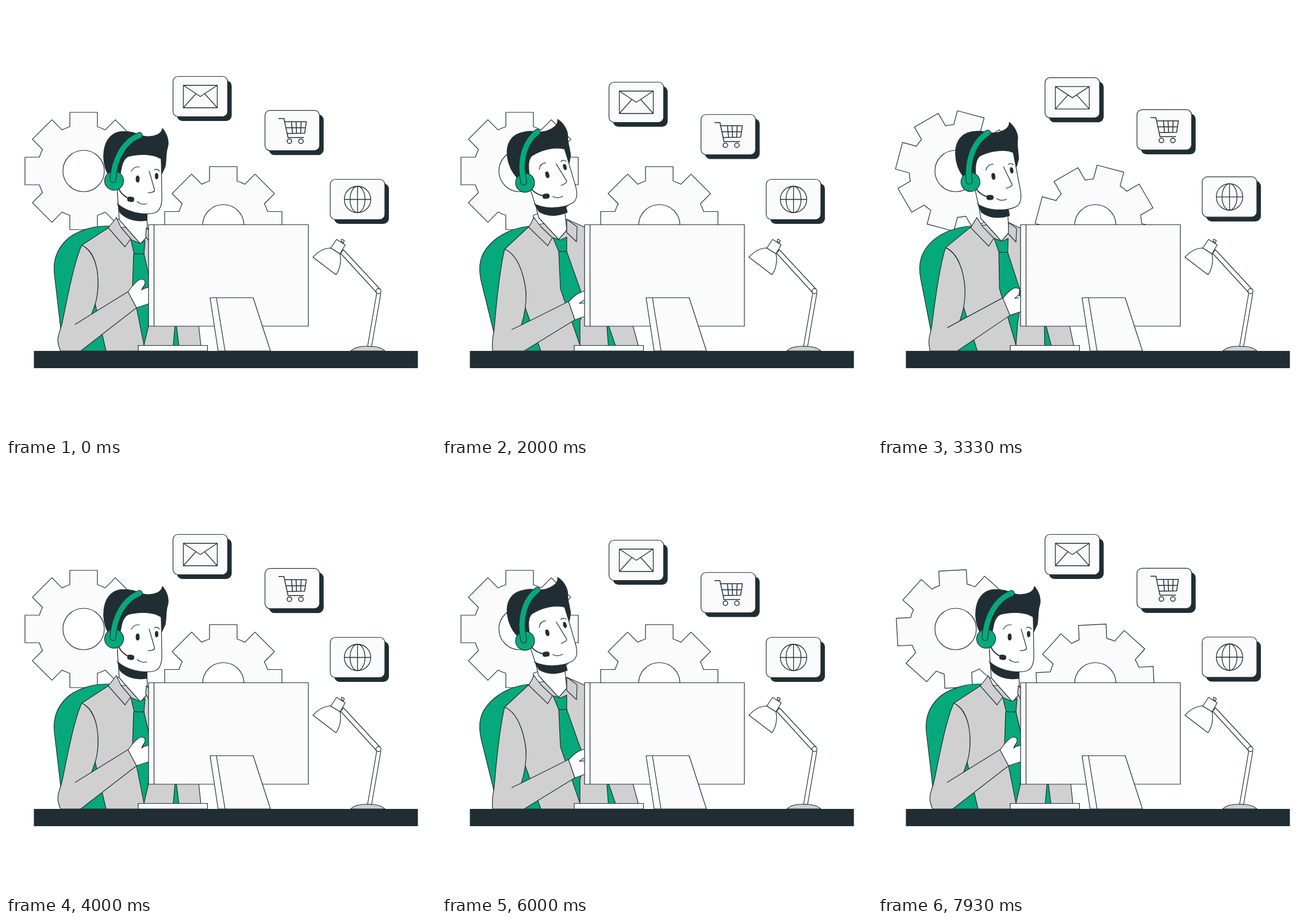
Recreate the animation shown at these times as an HTML page with a canvas. Size 748 by 748 pixels, loop 7.99 s.

```html
<!DOCTYPE html>
<html lang="en">
<head>
<meta charset="utf-8">
<title>Support desk</title>
<style>
html, body { margin: 0; width: 100%; height: 100%; overflow: hidden; background: #fff; }
canvas { display: block; width: 748px; height: 748px; }
</style>
</head>
<body>
<canvas id="stage"></canvas>
<script>
const SIZE = 748, LOOP = 7990, CYCLE = 4000;
const DARK = '#202e34', GREEN = '#05a97c', GRAY = '#d0d0d0', PALE = '#fbfbfb', WHITE = '#fff';
const canvas = document.getElementById('stage');
const ctx = canvas.getContext('2d');
const ratio = window.devicePixelRatio || 1;
canvas.width = canvas.height = SIZE * ratio;

let pose = 0;   // 0 = facing the desk, 1 = leaning back

function paint(path, fill, line = 1.2) {
  if (fill) { ctx.fillStyle = fill; ctx.fill(path); }
  if (line) { ctx.lineWidth = line; ctx.strokeStyle = DARK; ctx.stroke(path); }
}
function draw(d, fill, line) { paint(new Path2D(d), fill, line); }

// Blend two paths that share the same commands.
function morph(a, b, fill, line) {
  const to = b.match(/-?[\d.]+/g);
  let i = 0;
  draw(a.replace(/-?[\d.]+/g, n => +n + (to[i++] - n) * pose), fill, line);
}
function oval(x, y, rx, ry, fill, line) {
  const p = new Path2D();
  p.ellipse(x, y, rx, ry, 0, 0, Math.PI * 2);
  paint(p, fill, line);
}
function box(x, y, w, h, r, fill, line) {
  const p = new Path2D();
  p.roundRect(x, y, w, h, r);
  paint(p, fill, line);
}

function gear(x, y, turn) {
  const half = 24, tip = 102, base = 77;
  const root = Math.hypot(half, base), edge = Math.atan2(half, base);
  const outer = Math.hypot(half, tip), top = Math.atan2(half, tip);
  const p = new Path2D();
  for (let i = 0; i < 8; i++) {
    const a = turn + i * Math.PI / 4 - Math.PI / 2;
    p.arc(x, y, root, a - Math.PI / 4 + edge, a - edge);
    for (const s of [-top, top]) p.lineTo(x + outer * Math.cos(a + s), y + outer * Math.sin(a + s));
    p.lineTo(x + root * Math.cos(a + edge), y + root * Math.sin(a + edge));
  }
  p.closePath();
  paint(p, PALE);
  oval(x, y, 36, 36, WHITE);
}

function mail() {
  draw('M18 15.5H77V54.5H18Z M18 15.5L47.5 35L77 15.5 M18 54.5L40 30 M77 54.5L55 30', null, 1.3);
}
function cart() {
  draw('M23.5 14H33L40 47H68 M35 19.5H72L69 39.5L39 40 M37 30H70.5 M46 19.5L48 40 M54 19.5L55 40 M63 19.5L62 40', null, 1.5);
  oval(42.5, 53.5, 4, 4, null, 1.5);
  oval(62.5, 53.5, 4, 4, null, 1.5);
}
function globe() {
  oval(47.5, 35, 23, 23, null, 1.3);
  oval(47.5, 35, 13, 23, null, 1.3);
  draw('M47.5 12V58 M24.5 35H70.5', null, 1.3);
}
function card(x, y, phase, t, icon) {
  ctx.save();
  ctx.translate(x, y + 5 * Math.sin(t / CYCLE * Math.PI * 2 + phase * Math.PI / 180));
  box(7.5, 7.5, 94, 69.5, 9, DARK);
  box(0, 0, 95, 70, 9, PALE);
  icon();
  ctx.restore();
}

function body(tap) {
  morph('M182 383C150 381 119 393 104 408C88 424 82 443 84 465L95 560L100 600L174 600L190 500Z',
        'M156 383C125 384 98 399 83 415C67 432 62 450 68 478L90 567L92 600L172 600L180 500Z', GREEN);
  morph('M181 384L132 416C152 425 160 450 160 485C160 500 157 510 155 518L174 600L340 600L334 545L270 400L246 387Z',
        'M152 383L109 423C130 432 142 462 146 497C147 506 145 514 143 520L172 600L344 600L329 545L260 390L217 371Z', GRAY);
  morph('M295 545L290 600L302 600Z', 'M286 545L290 600L305 600Z', GREEN);
  morph('M194 325L197 372L234 414L246 400L245 350Z',
        'M157 320L168 368L203 406L217 390L212 340Z', WHITE);
  morph('M222 431L220 490L240 590L248 556L250 475L240 431Z',
        'M203 427L206 492L240 590L240 548L250 520L217 427Z', GREEN);
  morph('M217 406L233 413L242 408L240 431L223 431Z',
        'M193 403L206 407L217 402L217 427L203 427Z', GREEN);
  morph('M192 368L178 386L207 419L217 405L200 385Z',
        'M160 368L151 385L184 417L192 403L172 384Z', GRAY);
  morph('M244 386L251 392L250 412L243 400Z',
        'M217 371L235 384L234 410L217 394Z', GRAY);

  // Hand, then the sleeve over its wrist
  const y = n => n - tap;
  morph('M212 498C218 489 228 476 236 475C244 476 243 483 239 488L236 494C242 490 246 489 251 490L251 517L227 525Z',
        `M220 ${y(517)}C226 ${y(510)} 232 ${y(505)} 237 ${y(502)}C242 ${y(500)} 246 ${y(498)} 251 ${y(497)}L251 ${y(511)}C251 ${y(514)} 251 ${y(520)} 251 ${y(525)}L251 ${y(541)}L231 ${y(548)}Z`, WHITE);
  morph('M239 488L236 494L236 494', `M251 ${y(511)}L239 ${y(519)}L251 ${y(518)}`);
  morph('M132 416C120 440 108 500 98 550C93 572 85 578 95 600L130 600L227 525L212 497L149 536C156 517 160 507 160 480C160 450 150 425 132 416Z',
        `M109 423C102 450 95 510 91 560C90 573 86 578 88 600L143 600L231 ${y(548)}L220 ${y(516)}L138 555C144 537 147 520 146 497C142 462 130 432 109 423Z`, GRAY);
  morph('M120 554L149 536', 'M121 563L138 555');
}

function head() {
  ctx.save();
  ctx.translate(188 - 43.5 * pose, 304 + 3.5 * pose);
  ctx.rotate(-15.5 * pose * Math.PI / 180);
  ctx.translate(-188, -304);
  draw('M194 343L198 359C212 374 232 375 245 373L245 360Z', DARK);
  draw('M192 285C192 262 215 250 270 260L271 328C272 345 268 357 258 360C238 365 210 358 195 345Z', WHITE);
  draw('M177 292C165 268 168 235 187 223C197 216 211 218 221 220C232 224 240 228 249 227C262 226 271 222 272 213C281 223 284 237 281 246C278 254 279 268 277 279L271.5 291L270 266C255 256 228 257 212 262C203 267 201 279 199 291Z', DARK);

  oval(188, 304, 16.5, 16.5, GREEN);
  const band = new Path2D('M186 302C188 265 206 235 232 225');
  ctx.lineCap = 'round';
  for (const [w, c] of [[11.5, DARK], [9.3, GREEN]]) {
    ctx.lineWidth = w;
    ctx.strokeStyle = c;
    ctx.stroke(band);
  }
  draw('M196 318C201 328 207 332 214 335', null, 1.8);
  ctx.save();
  ctx.translate(217, 336);
  ctx.rotate(.15);
  box(-5.5, -3.5, 11, 7.5, 3, DARK);
  ctx.restore();

  oval(229, 301, 2.8, 5.3, DARK);
  oval(262, 296, 2.4, 4.8, DARK);
  draw('M218 288C221 281 226 279 232 280 M258 285C261 283 264 284 267 287 M249 287L258.5 320C259 323 253 325 247 325 M228 340C232 344 239 346 245 344');
  ctx.lineCap = 'butt';
  ctx.restore();
}

function desk() {
  draw('M248 380.5H526V557H248Z', PALE);
  draw('M257.5 380.5V557');
  draw('M355 507.5H430L460 600H369Z', PALE);
  draw('M366 507.5L381 600');
  draw('M230 590.5H350.5V600H230Z', PALE);
}

function lamp() {
  draw('M600 600C610 589 648 589 659 600Z', GRAY);
  draw('M645 499L629 592L636 592L652 500Z', WHITE);
  draw('M582 430L645 499L651 493L587 424Z', WHITE);
  oval(648, 496, 4.3, 4.3, WHITE);
  draw('M583 409L584 405.5L588.5 408L587 412Z', WHITE);
  draw('M534 437C543 427 553 421 565 421L581 431C584 445 580 460 574 467.5Z', WHITE);
  draw('M575 406L590 415.5L581 431L565 421Z', WHITE);
}

const ease = x => { x = Math.min(1, Math.max(0, x)); return x * x * (3 - 2 * x); };

function render(now) {
  const t = now % LOOP;
  const step = Math.floor(t / 200) * 200 + (t % 200 >= 130 ? 400 / 3 : 0);
  const c = step % CYCLE;
  pose = ease((c - 200) / 800) * (1 - ease((c - 3000) / 800));
  const tap = 1.5 * (1 - Math.cos((c - 1133.3) / 666.7 * Math.PI * 2));
  const turn = step / 1000 * Math.PI / 4;

  ctx.setTransform(ratio, 0, 0, ratio, 0, 0);
  ctx.fillStyle = WHITE;
  ctx.fillRect(0, 0, SIZE, SIZE);
  ctx.lineJoin = 'round';
  gear(135, 287, turn);
  gear(378, 381.5, turn);
  card(290.5, 127.5, -85, step, mail);
  card(450.5, 185.2, -45, step, cart);
  card(564, 301.5, 0, step, globe);
  body(tap);
  head();
  desk();
  lamp();
  box(48.5, 600, 668, 30, 0, DARK, 0);
}

const start = performance.now();
function tick() {
  render(performance.now() - start);
  requestAnimationFrame(tick);
}
tick();
</script>
</body>
</html>
```
